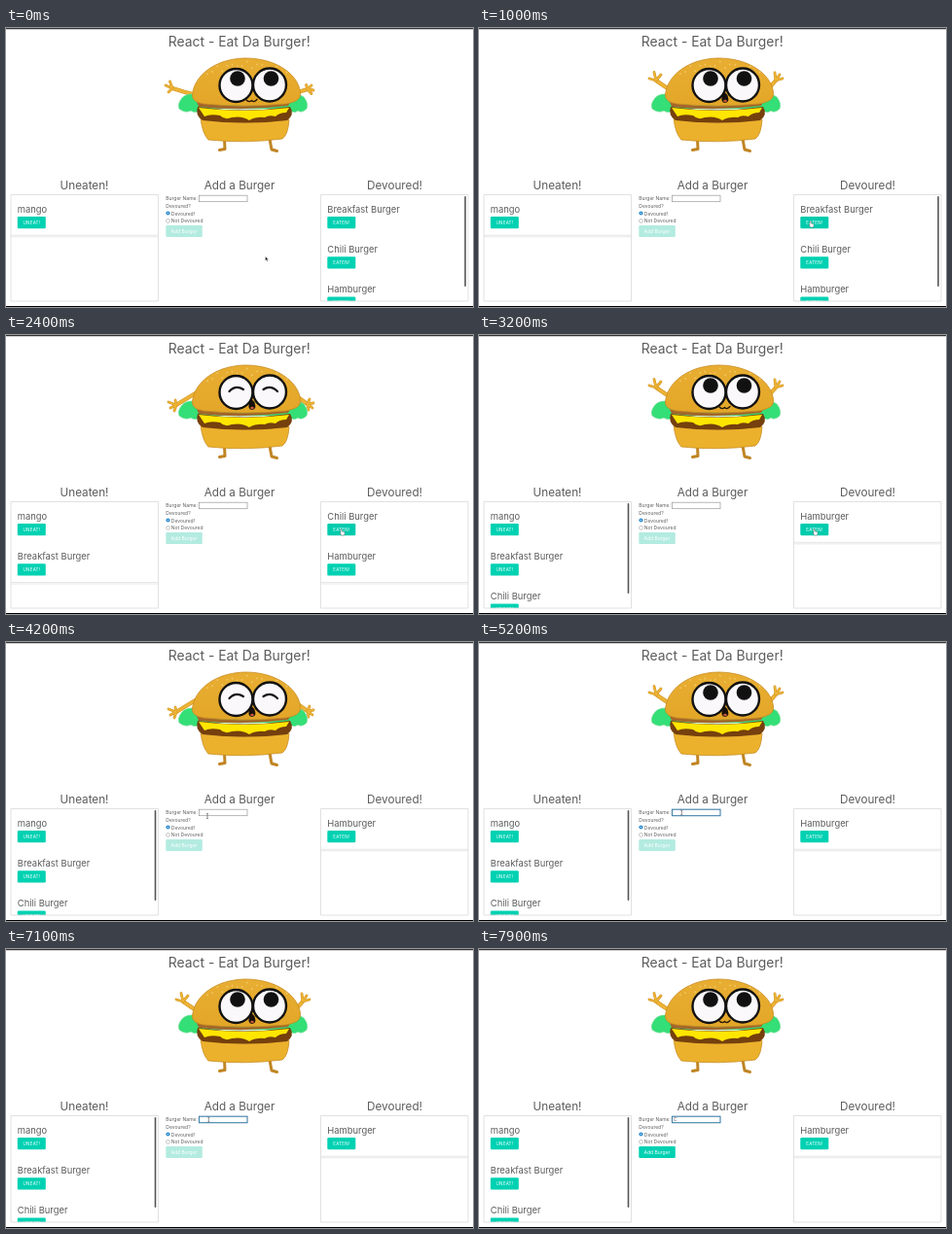
These frames come from a looping animation (480 px wide and 287 px high, 8000 ms). An HTML page:

```html
<!DOCTYPE html>
<html lang="en">
<head>
<meta charset="utf-8">
<title>React - Eat Da Burger!</title>
<style>
  html, body { margin: 0; width: 100%; height: 100%; overflow: hidden; background: #fff; }
  svg { display: block; width: 100vw; height: 100vh; font-family: Inter, Roboto, sans-serif; fill: #5c5c5c; }
  .title { font-size: 13.9px; text-anchor: middle; }
  .heading { font-size: 11.7px; text-anchor: middle; }
  .name { font-size: 9.4px; }
  .form { font-size: 5px; }
  .button { font-size: 4.5px; letter-spacing: .25px; text-anchor: middle; fill: #fff; }
  .line { fill: none; stroke-linecap: round; stroke-linejoin: round; }
</style>
</head>
<body>
<svg viewBox="0 0 480 287" preserveAspectRatio="none">
  <defs>
    <clipPath id="lists"><path d="M5 171.5H156.5V281H5zM323.5 171.5H475V281H323.5z"/></clipPath>
    <linearGradient id="bun" x2="0" y2="1">
      <stop stop-color="#e8ae32"/><stop offset="1" stop-color="#e3a628"/>
    </linearGradient>
  </defs>
  <rect width="480" height="287" fill="#fff"/>
  <path d="M0 0H480V1.2H0z" fill="#333"/>
  <path d="M0 286H480V287H0z" fill="#000"/>
  <text class="title" x="239.7" y="19">React - Eat Da Burger!</text>
  <text class="heading" x="80.5" y="166">Uneaten!</text>
  <text class="heading" x="240" y="166">Add a Burger</text>
  <text class="heading" x="399.5" y="166">Devoured!</text>

  <g id="burger">
    <g class="line" stroke="#c08524" stroke-width="3">
      <path d="M224.5 114L225 124.5L219.5 125.5M271 114L273 125L278.5 126.5"/>
    </g>
    <g id="arms" class="line"></g>
    <path d="M200 93Q245 101 291 94Q290 110 284 114Q245 119 208 115Q202 109 200 93Z" fill="#ebb12c" stroke="#c88d24" stroke-width=".8"/>
    <path d="M199 69Q186 66 181 72Q176 78 178 83Q184 88 190 85Q196 89 200 83H291Q295 89 300 85Q304 88 309 83Q311 77 306 71Q300 66 291 70Z" fill="#33df76" stroke="#6fdc92" stroke-width=".7"/>
    <path d="M197 81Q244 88 292 81Q297 89 289 95Q245 100 202 95Q194 90 197 81Z" fill="#75400d"/>
    <path d="M198 82Q245 88 291 82L288 87Q281 87 277 91Q270 89 266 92Q257 91 250 95Q243 90 232 92Q225 95 220 90Q210 88 204 91Z" fill="#ffe600"/>
    <path d="M196 76Q246 85 293 75L290 80Q245 86 198 81Z" fill="#a3662a"/>
    <path d="M191.5 69C193 49 215 31.5 246 31C277 31 300 47 302.500 66C303.500 74 297 76 288 78Q244 82 203 78Q191 76 191.5 69Z" fill="url(#bun)" stroke="#c98d24" stroke-width=".8"/>
    <g id="seeds" fill="#f2cb6c"></g>
    <g fill="#faf8fb" stroke="#111" stroke-width="2.4">
      <circle cx="236.5" cy="59" r="17"/><circle cx="271" cy="58.5" r="17"/>
    </g>
    <g id="face"></g>
  </g>

  <g class="form">
    <text x="164.3" y="177.2">Burger Name:</text>
    <text x="164.3" y="185">Devoured?</text>
    <text x="169.8" y="192.6">Devoured!</text>
    <text x="169.8" y="200.4">Not Devoured</text>
    <circle cx="166.5" cy="190.5" r="2.1" fill="#2f8fd0"/>
    <circle cx="166.5" cy="190.5" r=".5" fill="#fff"/>
    <circle cx="166.5" cy="198.4" r="1.9" fill="#fff" stroke="#888" stroke-width=".5"/>
    <rect id="input" x="198.5" y="172.2" width="49.5" height="6.5" fill="#fff"/>
    <text id="value" x="199.8" y="177.3"></text>
    <rect id="submit" x="164.3" y="203" width="37.5" height="12" rx="1.2"/>
    <text x="183" y="210.8" text-anchor="middle" fill="#fff">Add Burger</text>
  </g>

  <g id="items" clip-path="url(#lists)"></g>
  <path d="M5 171.5H156.5V281H5zM323.5 171.5H475V281H323.5z" fill="none" stroke="#dedede" stroke-width=".9"/>
  <g id="cursor"></g>
</svg>
<script>
const LOOP = 8000, STEP = 100, PITCH = 41.3;
const FIRST_CLICK = 1500, SECOND_CLICK = 3000, FOCUS = 4700, TYPE = 7700;
const $ = id => document.getElementById(id);

// Time, x, y of the pointer's resting places.
const stops = [[0, 266.5, 235], [200, 266.5, 235], [900, 340.5, 199], [1800, 340.5, 199],
  [2200, 344.5, 200], [3600, 344.5, 200], [4200, 207, 179], [4600, 208.3, 175.5]];

const pointers = {
  arrow: '<path d="M0 0V4.6L1.1 3.6L2 5.3L2.7 4.9L1.9 3.3H3.3Z" fill="#111" stroke="#fff" stroke-width=".4"/>',
  hand: '<path d="M-.5 0Q.3-.8 .7 .2V2L3.2 2.6Q4 3 3.6 4.7L3 6H.2L-1.5 3.6L-.5 3.5Z" fill="#fff" stroke="#444" stroke-width=".4"/>',
  beam: '<path d="M-1-2.5Q0-2.5 0-2Q0-2.5 1-2.5M0-2V2M-1 2.5Q0 2.5 0 2Q0 2.5 1 2.5" fill="none" stroke="#444" stroke-width=".6"/>'
};

// Left and right limb, each an arm followed by its fingers.
const arms = {
  side: ['M196 69Q183 66 171 62', 'M171 62L164 59M171 62L168.5 55M171 62L167 66',
    'M296 67Q304 65 310 63', 'M310 63L308.5 58.5M310 63L314 59M310 63L316 64M310 63L314 67.5'],
  down: ['M198 58Q188 64 175 72', 'M175 72L167 69M175 72L169 75M175 72L173 78M175 72L174 67',
    'M293 59Q301 65 310 71', 'M310 71L312 66M310 71L316 70M310 71L315 75M310 71L311 77'],
  up: ['M197 64Q189 59 182 54', 'M182 54L175 52M182 54L180 45.5M182 54L187 48',
    'M293 67Q300 60 305 54', 'M305 54L304 46M305 54L309 48M305 54L312 52']
};

const ease = p => p * p * (3 - 2 * p);

function pointerAt(t) {
  const next = stops.findIndex(s => s[0] > t);
  if (next < 0) return stops.at(-1).slice(1);
  const [t0, x0, y0] = stops[next - 1], [t1, x1, y1] = stops[next];
  const p = ease((t - t0) / (t1 - t0));
  return [x0 + (x1 - x0) * p, y0 + (y1 - y0) * p];
}

function list(left, names, label, hover) {
  const bottom = 172 + PITCH * names.length;
  const items = names.map((name, i) => {
    const y = i * PITCH;
    return `<text class="name" x="${left + 6.8}" y="${189.5 + y}">${name}</text>
      <rect x="${left + 6.8}" y="${194 + y}" width="29" height="12.2" rx="1.2" fill="${hover && !i ? '#00cbad' : '#00d1b2'}"/>
      <text class="button" x="${left + 21.4}" y="${201.6 + y}">${label}</text>`;
  });
  const edge = `<path d="M${left} ${bottom}h151.5" stroke="#e2e2e2" stroke-width=".9"/>
    <path d="M${left} ${bottom + 1.5}h151.5" stroke="#f0f0f0" stroke-width="1.5"/>`;
  const bar = names.length > 2
    ? `<rect x="${left + 147.7}" y="173" width="1.6" height="93" rx=".8" fill="#555"/>` : '';
  return edge + items.join('') + bar;
}

function limb(path, width) {
  return `<path d="${path}" stroke="#cf9426" stroke-width="${width}"/>
    <path d="${path}" stroke="#edb334" stroke-width="${width - 1}"/>`;
}

function drawBurger(step) {
  const k = step % 15, low = k % 3 === 0, open = k > 5, squint = low && open;
  const pose = squint ? arms.down : low ? arms.side : arms.up;
  $('arms').innerHTML = pose.map((path, i) => limb(path, i % 2 ? 2.8 : 4.2)).join('');
  const eyes = squint
    ? '<path class="line" d="M229.5 58Q236 51 244 56M264.5 56Q272 51 279 58" stroke="#111" stroke-width="2.2"/>'
    : '<g fill="#111"><circle cx="238" cy="52" r="7.8"/><circle cx="272.5" cy="52" r="7.8"/></g>';
  const mouth = open
    ? '<path d="M250 70Q252.5 64 255.5 69.5Q258 76.5 253 77Q248 76.500 250 70Z" fill="#17100a"/><ellipse cx="253" cy="75" rx="1.8" ry="1.2" fill="#c8573a"/>'
    : '<path class="line" d="M247 74Q250 77 252.5 74.500Q255 77 258 73.5" stroke="#24170a" stroke-width="1.3"/>';
  $('face').innerHTML = eyes + mouth;
}

function draw(t) {
  const uneaten = ['mango'], devoured = ['Breakfast Burger', 'Chili Burger', 'Hamburger'];
  if (t >= FIRST_CLICK) uneaten.push(devoured.shift());
  if (t >= SECOND_CLICK) uneaten.push(devoured.shift());

  const [x, y] = pointerAt(t);
  const hover = x > 330.5 && y < 206;
  $('items').innerHTML = list(5, uneaten, 'UNEAT!') + list(323.5, devoured, 'EATEN!', hover);

  const focused = t >= FOCUS, typed = t >= TYPE;
  $('input').setAttribute('stroke', focused ? '#3f7fa8' : '#999');
  $('input').setAttribute('stroke-width', focused ? 1.1 : .7);
  $('value').textContent = typed ? 'C' : '';
  $('submit').setAttribute('fill', typed ? '#00d1b2' : '#b3ebe0');

  const kind = hover ? 'hand' : t >= 4100 ? 'beam' : 'arrow';
  $('cursor').innerHTML = typed ? '' : pointers[kind];
  $('cursor').setAttribute('transform', `translate(${x} ${y})`);
  drawBurger(t / STEP);
}

$('seeds').innerHTML = Array.from({ length: 17 }, (_, i) => {
  const x = 207 + i * 5.1, y = 39 + ((x - 247) / 14) ** 2 - (i % 3) * 2.2 + (i % 2) * 2;
  return `<ellipse cx="${x}" cy="${y}" rx="1.1" ry=".7" transform="rotate(${i * 50} ${x} ${y})"/>`;
}).join('');

function frame(now) {
  draw(Math.floor(now % LOOP / STEP) * STEP);
  requestAnimationFrame(frame);
}
draw(0);
requestAnimationFrame(frame);
</script>
</body>
</html>
```
